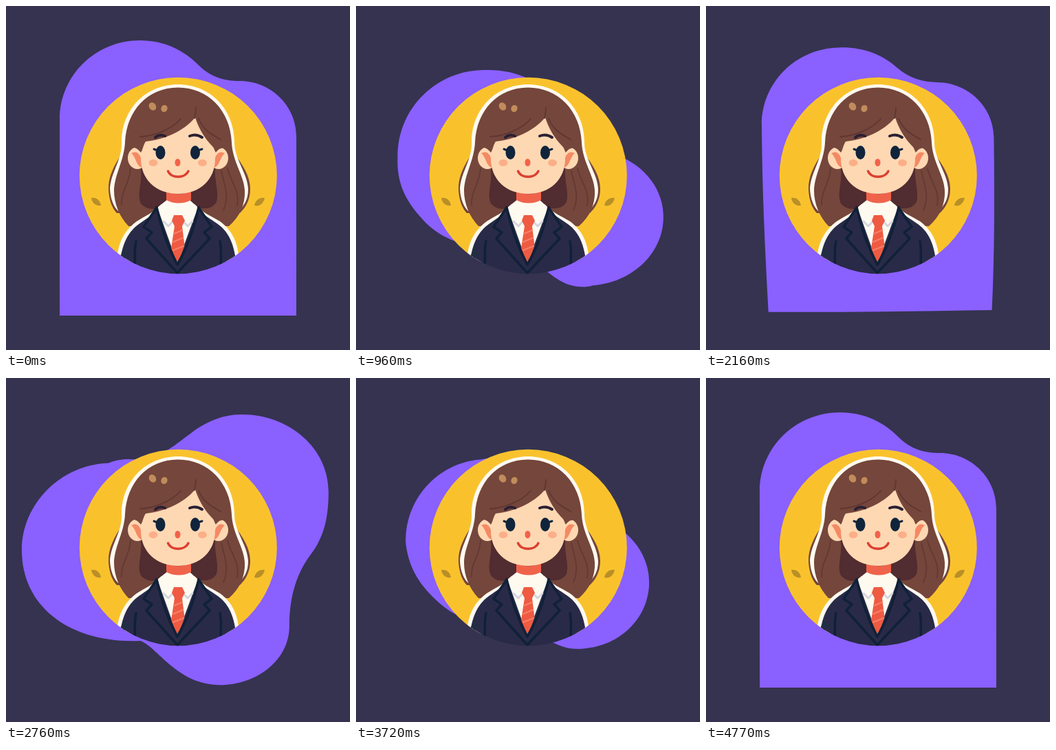
An HTML page for the animation above (4.8 s loop, 500 px wide and 500 px high).

```html
<!DOCTYPE html>
<html lang="en">
<head>
<meta charset="utf-8">
<title>Avatar with morphing blob</title>
<style>
  html, body { margin: 0; width: 100%; height: 100%; overflow: hidden; background: #353350; }
  svg { display: block; width: 100%; height: 100%; }
  .line { fill: none; stroke-linecap: round; stroke-linejoin: round; }
  .hair { fill: #75463b; }
  .cream { fill: #fffaf0; }
  .skin { fill: #fed8b3; }
  .navy { fill: #10243c; }
  .suit { fill: #292a48; }
  .blob {
    fill: #8a60ff;
    animation: morph 2.4s cubic-bezier(.3, .1, .1, 1) infinite;
  }
  /* arch, three lobes, two lobes, small round shape: same ten segments each */
  @keyframes morph {
    0%, 100% {
      d: path("M78 450 C78 402 78 355 78 307 C78 260 78 213 78 165 C78 101 130 50 195 50 C230 50 258 64 280 86 C298 104 318 109 340 109 C385 109 422 145 422 190 C422 233 422 277 422 320 C422 363 422 407 422 450 C365 450 307 450 250 450 C193 450 135 450 78 450 Z");
    }
    25% {
      d: path("M206 376 C96 385 18 332 18 245 C18 176 80 118 155 120 C176 117 190 124 200 126 C228 119 246 99 266 81 C287 62 312 48 343 48 C415 48 473 99 473 163 C473 195 468 225 444 252 C424 275 411 307 411 352 C416 409 367 446 317 446 C254 446 228 386 206 376 Z");
    }
    50% {
      d: path("M205 345 C170 350 133 341 104 316 C75 291 57 268 52 228 C50 150 112 90 186 90 C210 90 232 97 250 108 C275 122 300 145 320 165 C335 185 350 210 372 222 C415 235 447 272 447 315 C447 370 398 411 338 411 C320 411 303 404 290 392 C268 374 235 345 205 345 Z");
    }
    75% {
      d: path("M232 386 C203 384 174 368 153 347 C132 326 119 301 114 272 C108 232 132 190 170 176 C195 163 225 135 250 128 C270 123 289 126 306 132 C342 142 369 166 378 196 C386 222 386 245 384 265 C381 300 367 332 344 354 C333 364 317 374 302 380 C279 388 255 389 232 386 Z");
    }
  }
</style>
</head>
<body>
<svg viewBox="0 0 500 500" role="img" aria-label="Smiling woman in a suit">
  <defs>
    <clipPath id="disc"><ellipse cx="250.3" cy="246.5" rx="143.5" ry="142.7"/></clipPath>
  </defs>
  <rect width="500" height="500" fill="#353350"/>
  <path class="blob" d="M78 450V165A117 115 0 0 1 195 50C230 50 258 64 280 86C298 104 318 109 340 109C385 109 422 145 422 190V450Z"/>

  <g clip-path="url(#disc)">
    <rect x="100" y="100" width="300" height="270" fill="#f9c22d"/>

    <!-- leaves -->
    <g fill="#b98f27">
      <path d="M124 279C132 278 137 283 138 290C130 291 125 286 124 279Z"/>
      <path d="M376 279C368 278 362 283 361 290C369 292 374 287 376 279Z"/>
    </g>

    <!-- back hair with its pale rim -->
    <path class="hair" d="M169 214C158 230 148 248 149 267C150 284 155 295 161 301L340 301C348 293 355 282 355 266C355 248 344 230 331 214Z"/>
    <path class="cream" d="M250 114C203 114 169 150 168 196C170 222 152 242 151 266C152 282 157 292 163 298L338 298C346 290 352 282 352 266C351 242 331 222 332 196C331 150 297 114 250 114Z"/>
    <path class="hair" d="M250 118.500C206 118.500 175 152 173 198C172 224 158 244 157 268C157 288 165 306 178 320L324 320C340 306 348 288 347 268C346 246 329 226 328 198C326 152 294 118.500 250 118.500Z"/>
    <path fill="#512c30" d="M196 236C198 260 190 272 196 287C205 298 220 296 236 290L266 290C284 296 298 297 306 285C310 270 303 258 304 236Z"/>
    <g class="line" stroke="#633933" stroke-width="1.8">
      <path d="M181 236C180 258 167 268 168 289"/>
      <path d="M322 236C327 258 340 266 336 290"/>
      <path d="M313 240C318 262 325 276 316 297"/>
    </g>

    <!-- suit -->
    <path class="cream" d="M161 372C162 345 172 326 190 313C202 305 214 301 226 288L274 288C286 301 298 305 311 313C329 326 338 345 339 372Z"/>
    <path class="suit" d="M164 395C165 352 175 330 193 317C204 309 213 305 220 293L279 293C287 305 297 309 308 317C326 330 335 352 336 395Z"/>

    <!-- neck, shirt and tie -->
    <path class="cream" d="M235 281L220 293L249 374L279 293L266 281Z"/>
    <path fill="#ef634b" d="M233 268C244 275 258 275 269 268V282C258 288 244 288 233 282Z"/>
    <path class="line" stroke="#d6d5df" stroke-width="3" d="M229 313L236 320L247 308M271 313L264 320L253 308"/>
    <path fill="#ef5a42" d="M244 304H256L260 312L256 320L260 352L250 376L240 352L245 320L241 312Z"/>
    <path class="line" stroke="#f5806a" stroke-width="2.4" d="M244 331L256 326M243 343L257 337M243 355L258 349"/>

    <!-- lapels and seams -->
    <path class="suit" d="M219 293L200 321L212 329L204 338L249 388L249 377Z"/>
    <path class="suit" d="M280 293L299 321L288 329L296 338L249 388L249 377Z"/>
    <g class="line" stroke="#0f2137" stroke-width="3.6">
      <path d="M219 293C225 320 235 350 249 376C264 350 274 320 280 293"/>
      <path d="M219 293L200 321L212 329L204 338L249 388L296 338L288 329L299 321L280 293"/>
      <path d="M189 342C186 354 188 368 187 382M311 342C314 354 311 368 313 382"/>
    </g>
    <path class="line" stroke="#1d3140" stroke-width="2.5" d="M168 362L181 359M172 354L171 372"/>

    <!-- ears and face -->
    <ellipse class="skin" cx="191" cy="221" rx="14" ry="16"/>
    <ellipse class="skin" cx="309" cy="221" rx="14" ry="16"/>
    <path fill="#f48a64" d="M182 214C191 209 198 216 198 235C189 233 190 221 182 214Z"/>
    <path fill="#f48a64" d="M318 214C309 209 302 216 302 235C311 233 310 221 318 214Z"/>
    <path class="skin" d="M196 155H304V222C304 252 282 273 250 273C218 273 196 252 196 222Z"/>

    <!-- fringe -->
    <path class="hair" d="M176 207C172 160 206 120 250 120C294 120 328 156 326 207C316 205 310 206 305 213C303 210 303 208 301 205C289 193 280 178 275 162C257 183 230 194 203 197C199 203 199 209 196 213C190 205 183 204 176 207Z"/>
    <path class="line" stroke="#5f3632" stroke-width="1.8" d="M274 163C275 158 276 153 276 148M280 164C288 182 300 187 312 194M195 190C215 189 240 180 254 164"/>
    <g fill="#c18c5b">
      <ellipse cx="213" cy="146" rx="5" ry="6" transform="rotate(-35 213 146)"/>
      <ellipse cx="230" cy="149" rx="4.5" ry="5.2" transform="rotate(25 230 149)"/>
    </g>

    <!-- features -->
    <g class="line" stroke="#2a2034" stroke-width="4">
      <path d="M217 191C221 187 227 187 231 189"/>
      <path d="M267 189C272 187 279 187 285 191"/>
    </g>
    <ellipse class="navy" cx="224.5" cy="213" rx="7" ry="10"/>
    <ellipse class="navy" cx="275" cy="213" rx="7" ry="10"/>
    <path class="line" stroke="#10243c" stroke-width="3" d="M220 210L215 208M279 210L285 208"/>
    <ellipse cx="214" cy="228" rx="6.5" ry="5" fill="#fbaf89"/>
    <ellipse cx="285.5" cy="228" rx="6.5" ry="5" fill="#fbaf89"/>
    <ellipse cx="249.5" cy="227.5" rx="4" ry="5.5" fill="#f2624a"/>
    <path class="line" stroke="#dc4030" stroke-width="3.4" d="M235.500 240C240 251 260 251 265 240"/>
  </g>
</svg>
</body>
</html>
```
